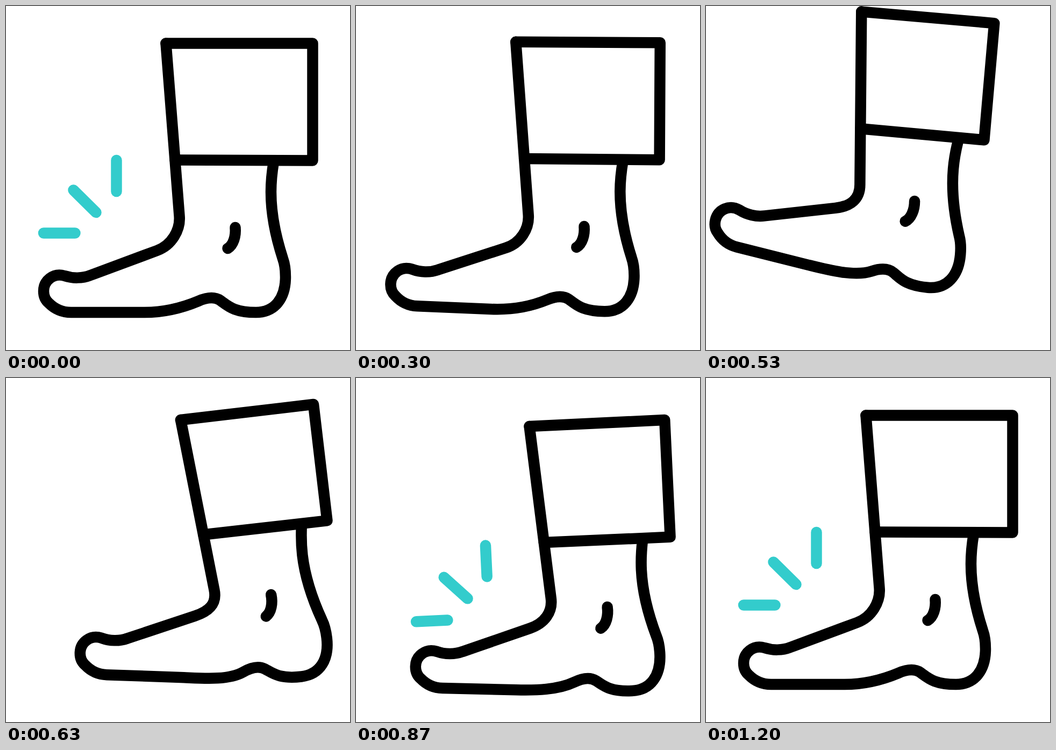
Recreate the animation shown at these times as an HTML page. Size 640 px wide and 640 px high, loop 1670 ms.

```html
<!DOCTYPE html>
<html lang="en">
<head>
<meta charset="utf-8">
<title>Stamping foot</title>
<style>
  html, body { margin: 0; width: 100%; height: 100%; overflow: hidden; background: #fff; }
  svg { display: block; width: 100vw; height: 100vh; }
  path { fill: none; stroke: #000; stroke-width: 20.5; stroke-linecap: round; stroke-linejoin: round; }
  .mark { stroke: #3cc; }
</style>
</head>
<body>
<svg viewBox="0 0 640 640">
  <g id="body">
    <path class="mark"/>
    <path class="mark"/>
    <path class="mark"/>
    <path id="foot"/>
    <path id="cuff"/>
    <path d="M426.5 412C428 428 423 445 412.5 451"/>
  </g>
</svg>
<script>
const LOOP = 1670, STEP = 100 / 3, FRAMES = 50;
const ANKLE = [426.5, 412];

// time, ankle x, ankle y, tilt, toe lift, lift pivot x, cuff width, cuff slant
const KEYS = [
  [0, 426.5, 412, 0, 0, 340, 273, 0],
  [300, 424.5, 410, .3, 2.1, 340, 268.5, 0],
  [433, 394.5, 377, 5.5, 8.9, 365, 250, 0],
  [495, 385, 364, 6.6, 9.1, 380, 248, 0],
  [533, 388, 363, 5, 9.1, 390, 248, 0],
  [633, 493, 403, -6.7, 8.7, 413, 248.7, 0],
  [700, 512, 413, -8, 7.8, 418, 250, 0],
  [800, 492, 427.5, -5, 5.4, 424, 252, 0],
  [867, 467.5, 426, -2.7, 4, 425, 252, 0],
  [1033, 431, 414.5, 0, 0, 425, 242, -2],
  [1200, 426.5, 412, 0, 0, 425, 273, 0]
];

// inner end, outer end
const MARKS = [
  [205.5, 345, 205.5, 287],
  [167.5, 384, 125.5, 342.5],
  [128.5, 422.5, 70, 422.5]
];

const byId = id => document.getElementById(id);
const body = byId('body'), foot = byId('foot'), cuff = byId('cuff');
const marks = document.querySelectorAll('.mark');
const lerp = (a, b, k) => a + (b - a) * k;
const ramp = (t, a, b) => Math.min(1, Math.max(0, (t - a) / (b - a)));

const rate = (i, c) => (KEYS[i + 1][c] - KEYS[i][c]) / (KEYS[i + 1][0] - KEYS[i][0]);

// monotone slope: flat at turning points
function slope(i, c) {
  if (i === 0 || i === KEYS.length - 1) return 0;
  const a = rate(i - 1, c), b = rate(i, c);
  return a * b > 0 ? 2 * a * b / (a + b) : 0;
}

function pose(t) {
  const last = KEYS.length - 1;
  if (t >= KEYS[last][0]) return KEYS[last].slice(1);
  let i = 0;
  while (t >= KEYS[i + 1][0]) i++;
  const a = KEYS[i], b = KEYS[i + 1], h = b[0] - a[0], u = (t - a[0]) / h, v = 1 - u;
  return a.slice(1).map((p, n) => {
    const c = n + 1;
    return p * v * v * (1 + 2 * u) + b[c] * u * u * (1 + 2 * v)
      + h * u * v * (slope(i, c) * v - slope(i + 1, c) * u);
  });
}

function footPath(lift, px) {
  const r = lift * Math.PI / 180, c = Math.cos(r), s = Math.sin(r), py = 445;
  const bend = (...n) => {
    let out = ' ';
    for (let i = 0; i < n.length; i += 2) {
      const x = n[i] - px, y = n[i + 1] - py;
      out += (px + x * c - y * s).toFixed(2) + ' ' + (py + x * s + y * c).toFixed(2) + ' ';
    }
    return out;
  };
  return 'M297.5 69.5L322.5 390C325 417' + bend(308, 445, 281, 455)
    + 'L' + bend(157, 501)
    + 'C' + bend(142, 507, 124, 507, 109, 502, 88, 496, 70, 511, 70, 530.5)
    + 'C' + bend(70, 540, 74, 548, 80, 553, 91, 564, 105, 570, 121, 570)
    + 'L' + bend(258, 570)
    + 'C' + bend(294, 570) + '327 562 358 549'
    + 'C373 542.5 388 540.5 399 548C412 557 423 570 465 570'
    + 'C500 570 520 544 520 504C520 492 519 481 515 470C503 433 493 390 493 346C493 326 495 308 498 290';
}

function draw(t) {
  const [x, y, tilt, lift, px, w, slant] = pose(t);
  body.setAttribute('transform',
    `translate(${x} ${y}) rotate(${tilt}) translate(${-ANKLE[0]} ${-ANKLE[1]})`);
  foot.setAttribute('d', footPath(lift, px));
  const right = 297.5 + w;
  cuff.setAttribute('d', `M297.5 69.5L${right} ${69.5 + slant}V${287.5 + slant / 2}L314.5 286.5`);

  const from = ramp(t, 0, 180), to = ramp(t, 740, 860);
  const [a, b] = t < 500 ? [from, 1] : [0, to];
  MARKS.forEach(([x1, y1, x2, y2], i) => {
    marks[i].style.display = b > a && b > 0 ? '' : 'none';
    marks[i].setAttribute('d',
      `M${lerp(x1, x2, a)} ${lerp(y1, y2, a)}L${lerp(x1, x2, b)} ${lerp(y1, y2, b)}`);
  });
}

const start = performance.now();
function tick() {
  const t = (performance.now() - start) % LOOP;
  draw(Math.floor((t + 5) / 33.34) % FRAMES * STEP);
  requestAnimationFrame(tick);
}
tick();
</script>
</body>
</html>
```
